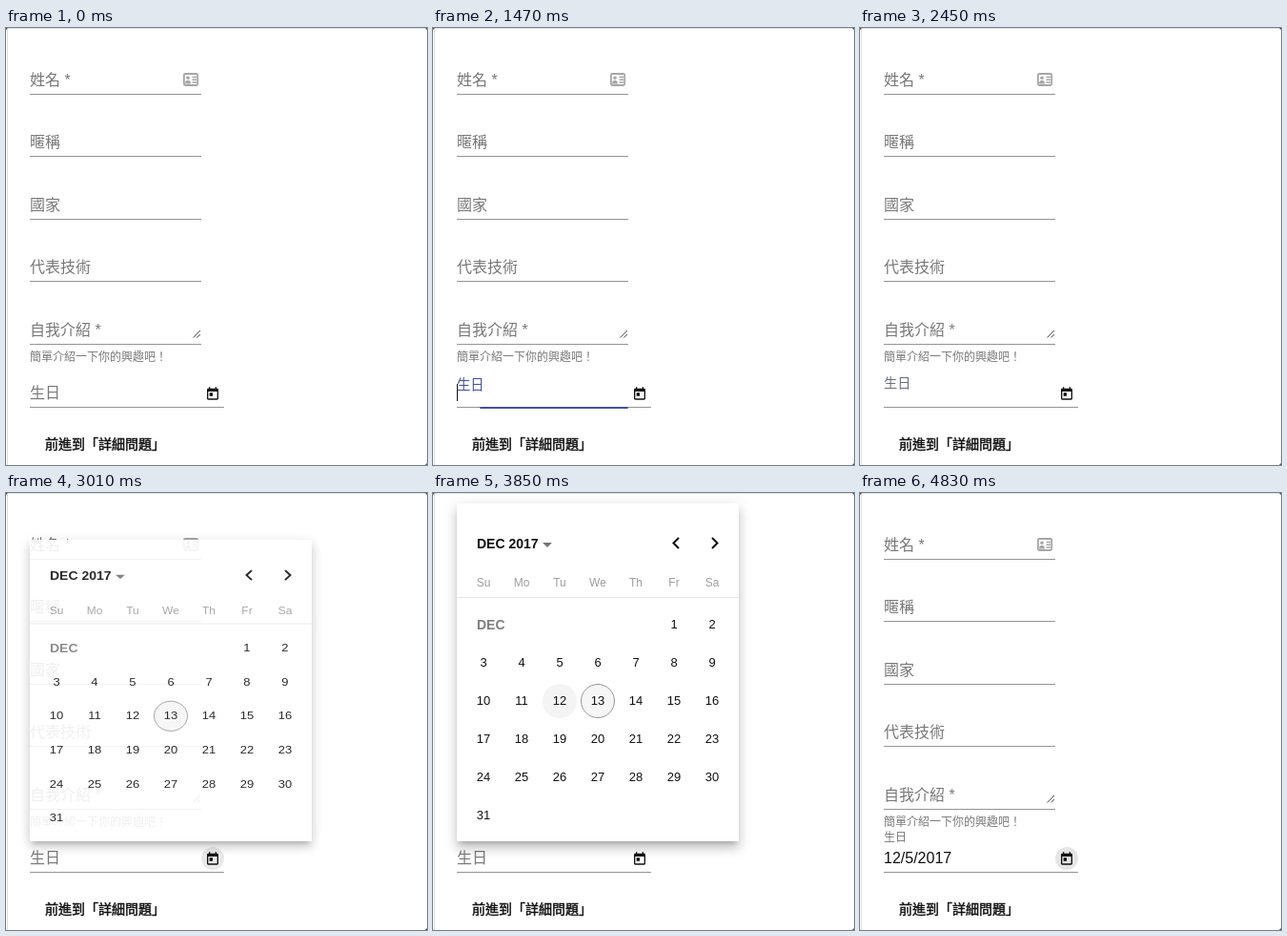
Write an HTML page that moves like this. It is 442 by 458 pixels and loops after 5.81 s.

```html
<!DOCTYPE html>
<html lang="zh-Hant">
<head>
<meta charset="utf-8">
<title>Form with date picker</title>
<style>
  html, body { margin: 0; width: 100%; height: 100%; overflow: hidden; background: #fff; }
  svg { display: block; width: 442px; height: 458px; }
  text { font-family: "Liberation Sans", "Noto Sans CJK TC", "Noto Sans CJK", sans-serif; }
  .panel { position: absolute; left: 25px; top: 11px; width: 296px; height: 354px; background: #fff;
    transform-origin: 50% 100%; overflow: visible;
    box-shadow: 0 5px 5px -3px rgba(0,0,0,.2), 0 8px 10px 1px rgba(0,0,0,.14), 0 3px 14px 2px rgba(0,0,0,.09); }
  .panel svg { width: 296px; height: 354px; }
</style>
</head>
<body>
<svg id="form" viewBox="0 0 442 458"></svg>
<div class="panel" id="panel"><svg id="calendar" viewBox="25 11 296 354"></svg></div>
<script>
const LOOP = 5810, STEP = 70;
const NS = "http://www.w3.org/2000/svg";
const GREY = "#787878", INK = "#111", ACCENT = "#46529a";
const form = document.getElementById("form");
const panel = document.getElementById("panel");
const calendar = document.getElementById("calendar");

function add(parent, tag, attrs, content) {
  const el = document.createElementNS(NS, tag);
  set(el, attrs);
  if (content !== undefined) el.textContent = content;
  parent.appendChild(el);
  return el;
}
function set(el, attrs) {
  for (const key in attrs) el.setAttribute(key, attrs[key]);
}
function text(parent, x, y, size, fill, content, extra = {}) {
  return add(parent, "text", { x, y, "font-size": size, fill, ...extra }, content);
}
function rect(parent, x, y, width, height, fill) {
  return add(parent, "rect", { x, y, width, height, fill });
}
function stroke(parent, d, color, width) {
  return add(parent, "path", { d, fill: "none", stroke: color, "stroke-width": width });
}

// Window edge
rect(form, 1, 0, 1, 458, "#dedede");
rect(form, 0, 0, 442, 1, "#e6e6e6");
add(form, "path", { d: "M0 0h2l-2 2zM442 0h-2l2 2zM442 458h-2l2-2z", fill: "#555" });

// Fields
["姓名 *", "暱稱", "國家", "代表技術", "自我介紹 *"].forEach((name, i) => {
  text(form, 25, Math.floor(60 + i * 65.5), 16, GREY, name);
  rect(form, 25, Math.floor(69 + i * 65.6), 180, 1, "#949494");
});
text(form, 25, 348.5, 12, GREY, "簡單介紹一下你的興趣吧！");
// A thin outline gives medium weight
text(form, 41, 441, 14, INK, "前進到「詳細問題」", { stroke: INK, "stroke-width": .45 });
stroke(form, "M196.5 324.5l7.5-7.5M200.5 324.5l3.5-3.5", "#555", 1);

// Contact card icon
add(form, "rect", { x: 186.9, y: 48, width: 14.3, height: 12, rx: 1.5, fill: "#fff", stroke: "#a6a6a6", "stroke-width": 1.8 });
add(form, "circle", { cx: 191, cy: 52.3, r: 1.8, fill: "#a6a6a6" });
add(form, "path", { d: "M188 58.5c0-5 6-5 6 0z", fill: "#a6a6a6" });
stroke(form, "M195.5 51.5h4.5M195.5 54.2h4.5M195.5 57h4.5", "#a6a6a6", 1.4);

// Date field
rect(form, 25, 397, 204, 1, "#949494");
const focusLine = rect(form, 25, 397, 204, 2, ACCENT);
const dateLabel = text(form, 0, 0, 16, GREY, "生日");
const dateValue = text(form, 25, 388, 16, INK, "12/5/2017");
const caret = rect(form, 25, 373, 1, 18, INK);
const halo = add(form, "circle", { cx: 217, cy: 383, r: 12, fill: "#000" });
add(form, "path", {
  transform: "translate(209 375.7) scale(.6667)", fill: INK,
  d: "M19 3h-1V1h-2v2H8V1H6v2H5c-1.1 0-2 .9-2 2v14c0 1.1.9 2 2 2h14c1.1 0 2-.9 2-2V5c0-1.1-.9-2-2-2zm0 16H5V8h14v11zM7 10h5v5H7z"
});

// Calendar
const MIDDLE = { "text-anchor": "middle" };
const BOLD = { "font-weight": 700 };
text(calendar, 46, 58, 14, INK, "DEC 2017", BOLD);
add(calendar, "path", { d: "M115 52h10l-5 5z", fill: "#757575" });
stroke(calendar, "M258 47l-5.5 5.5 5.5 5.5M293 47l5.5 5.5-5.5 5.5", INK, 2);
["Su", "Mo", "Tu", "We", "Th", "Fr", "Sa"].forEach((day, i) =>
  text(calendar, 53 + i * 40, 98, 12, "#9e9e9e", day, MIDDLE));
rect(calendar, 25, 109, 296, 1, "#e6e6e6");
text(calendar, 46, 143, 14, "#808080", "DEC", BOLD);

function cell(day) {
  const slot = day + 4;
  return { cx: 53 + slot % 7 * 40, cy: 138 + Math.floor(slot / 7) * 40 };
}
const hover = add(calendar, "circle", { r: 18, fill: "#f4f4f4" });
const today = add(calendar, "circle", { ...cell(13), r: 17.5, stroke: "#969696" });
for (let day = 1; day <= 31; day++) {
  const { cx, cy } = cell(day);
  text(calendar, cx, cy + 4, 13, INK, day, MIDDLE);
}

// Fraction of the way from start, over length ms
function span(t, start, length) {
  return Math.min(1, Math.max(0, (t - start) / length));
}
// cubic-bezier(.25, .8, .25, 1)
function ease(x) {
  let lo = 0, hi = 1;
  for (let i = 0; i < 24; i++) {
    const s = (lo + hi) / 2, r = 1 - s;
    if (.75 * s * r * r + .75 * s * s * r + s * s * s < x) lo = s; else hi = s;
  }
  const s = lo, r = 1 - s;
  return 2.4 * s * r * r + 3 * s * s * r + s * s * s;
}
function show(el, on) {
  el.style.display = on ? "" : "none";
}

function haloAt(t) {
  if (t >= 4690) return { r: 12, opacity: .1 };
  if (t >= 980 && t < 1470) return { r: 12, opacity: .1 };
  if (t > 2450) return { r: 12 * ease(span(t, 2450, 350)), opacity: .085 * (1 - span(t, 3430, 280)) };
  return { r: 0, opacity: 0 };
}
function hoveredDay(t) {
  return t >= 3990 ? 5 : t >= 3850 ? 12 : t >= 3710 ? 27 : 0;
}

function draw(t) {
  const focused = t >= 1470 && t < 2380;
  const picked = t >= 4690;
  const float = picked ? 1 : ease(span(t, 1420, 400)) - ease(span(t, 2380, 400));
  set(dateLabel, {
    transform: `translate(25 ${388 - 23.5 * float}) scale(${1 - .25 * float})`,
    fill: focused ? ACCENT : t >= 2380 && t < 2590 ? "#6e6f7e" : GREY
  });

  const grow = .5 + .5 * ease(span(t, 1420, 300));
  set(focusLine, { x: 127 - 102 * grow, width: 204 * grow });
  show(focusLine, focused);
  show(caret, t >= 1470 && t < 1960);
  show(dateValue, picked);
  set(halo, haloAt(t));

  const open = ease(span(t, 2910, 240));
  show(panel, open > 0 && !picked);
  panel.style.transform = `scale(1, ${open})`;
  panel.style.opacity = open;
  const day = hoveredDay(t);
  if (day) set(hover, cell(day));
  show(hover, day);
  set(today, { fill: t < 4550 ? "#f6f6f6" : "none" });
}

const begin = performance.now();
function tick() {
  const t = (performance.now() - begin) % LOOP;
  draw(Math.floor(t / STEP) * STEP);
  requestAnimationFrame(tick);
}
tick();
</script>
</body>
</html>
```
